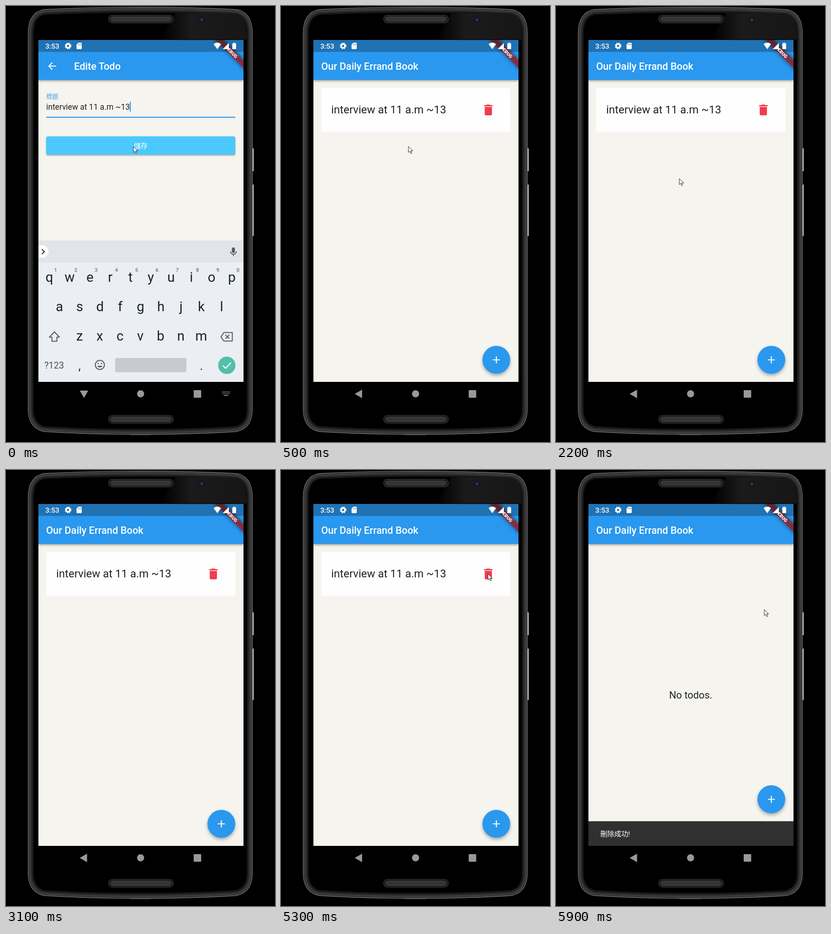
Write an HTML page that moves like this. It is 589 by 950 pixels and loops after 6000 ms.

```html
<!DOCTYPE html>
<html lang="zh-Hant">
<head>
<meta charset="utf-8">
<title>Todo app</title>
<style>
html, body { margin: 0; width: 100%; height: 100%; overflow: hidden; background: #000; }
svg { display: block; width: 589px; height: 950px; font-family: Roboto, "Noto Sans CJK TC", "Noto Sans CJK", sans-serif; }
</style>
</head>
<body>
<svg id="stage" viewBox="0 0 589 950"></svg>
<script>
const BLUE = '#2c98ee', CREAM = '#f5f4ee', KEY = '#17232e', GREY = '#525c65';
const LOOP = 6000, STEP = 100;

const text = (x, y, size, fill, str, extra = '') =>
  `<text x="${x}" y="${y}" font-size="${size}" fill="${fill}" ${extra}>${str}</text>`;
const rect = (x, y, w, h, fill, extra = '') =>
  `<rect x="${x}" y="${y}" width="${w}" height="${h}" fill="${fill}" ${extra}/>`;
const circle = (x, y, r, fill, extra = '') =>
  `<circle cx="${x}" cy="${y}" r="${r}" fill="${fill}" ${extra}/>`;
const path = (d, fill, extra = '') => `<path d="${d}" fill="${fill}" ${extra}/>`;
const line = (d, color, width, extra = '') =>
  path(d, 'none', `stroke="${color}" stroke-width="${width}" ${extra}`);
const icon = (x, y, scale, d, fill) =>
  path(d, fill, `transform="translate(${x} ${y}) scale(${scale}) translate(-12 -12)"`);
const middle = 'text-anchor="middle"';

// Phone outline, shrunk by i on every side
function body(i) {
  const l = 48 + i, r = 540 - i, t = 2 + i, b = 934 - i;
  return `M${l} 60Q${l} ${t + 11} 84 ${t + 5}Q180 ${t} 295 ${t}Q410 ${t} 504 ${t + 5}` +
    `Q${r} ${t + 11} ${r} 60V878Q${r} ${b - 13} 504 ${b - 6}Q410 ${b} 295 ${b}` +
    `Q180 ${b} 84 ${b - 6}Q${l} ${b - 13} ${l} 878Z`;
}

const speaker = y =>
  rect(224.5, y, 142, 17, '#1d1d1d', 'rx="8" stroke="#3c3c3c"') +
  rect(230, y + 4, 131, 9, '#343434', 'rx="4.5" stroke="#4a4a4a"');

const sideButton = (y, h) =>
  rect(538, y, 3, h, '#3a3a3a') + rect(540, y, 2.6, h, '#b0b0b0', 'rx="1"');

function phone() {
  let rim = '';
  for (let i = 3; i <= 12; i++) {
    const v = 68 - 6 * (i - 3);
    rim += path(body(i), `rgb(${v},${v},${v})`);
  }
  return sideButton(310, 50) + sideButton(389, 112) +
    rect(270, 930, 48, 6, '#222', 'rx="2"') +
    path(body(0.7), '#222', 'stroke="#777" stroke-width="1.4"') + rim +
    path(body(13), '#000') +
    path('M372 16H500Q527 20 527 60V73H340Z', 'url(#glare)') +
    speaker(20) + speaker(892) +
    circle(429, 30, 6.5, '#11131b') + circle(429, 30, 3.5, '#26325c');
}

const appBar = () => rect(71, 74, 449, 87, BLUE, 'filter="url(#bar)"');

const home = () => rect(71, 74, 449, 745, CREAM) +
  '<g id="card">' + rect(88, 179, 414, 95, '#fffefe', 'rx="5"') +
  text(110, 234, 24, '#212125', 'interview at 11 a.m ~13') +
  icon(454, 226.5, 1.31, 'M6 19c0 1.1.9 2 2 2h8c1.1 0 2-.9 2-2V7H6zM19 4h-3.5l-1-1h-5l-1 1H5v2h14z', '#f23b4e') +
  '</g>' +
  text(295, 498, 21.84, '#212125', 'No todos.', `${middle} id="empty"`) +
  appBar() + text(88, 139, 21.84, '#fff', 'Our Daily Errand Book', 'font-weight="500"') +
  '<g id="fab">' + circle(471.5, 0, 30.5, BLUE, 'filter="url(#high)"') +
  line('M463.8 0h15.4M471.5-7.7v15.4', '#fff', 2.2) + '</g>' +
  '<g id="snack">' + rect(71, 765.3, 449, 55, '#303030') +
  text(97, 798, 15.3, '#fff', '刪除成功!', 'id="snackText"') + '</g>';

const editor = () => rect(71, 74, 449, 745, CREAM) + appBar() +
  line('M110 131H94M101.5 123.3L93.8 131l7.7 7.7', '#fff', 2.1) +
  text(149, 139, 21.84, '#fff', 'Edite Todo', 'font-weight="500"') +
  text(88, 202, 13.1, '#4aa5ee', '標題') +
  text(88, 226, 17.47, '#212125', 'interview at 11 a.m ~13') +
  rect(271, 209, 2.2, 21, BLUE, 'id="caret"') +
  rect(88, 241.3, 414, 2.2, BLUE) +
  rect(88, 284, 414, 40, '#4cc9fc', 'rx="4" filter="url(#low)"') +
  `<g clip-path="url(#button)">${circle(0, 304, 1, '#fff', 'id="ripple" opacity=".22"')}</g>` +
  text(295, 310, 15.3, '#fff', '儲存', middle);

function keyRow(chars, x, y) {
  return [...chars].map((c, i) => text(x + 44.4 * i, y, 29.5, KEY, c, middle)).join('');
}

function keyboard() {
  const digits = [...'1234567890'].map((c, i) =>
    text(108.5 + 44.4 * i, 579, 11.5, '#6a737b', c, `${middle} font-weight="500"`)).join('');
  return rect(71, 511, 449, 309, '#ebeef3') + rect(71, 511, 449, 48, '#e1e4e8') +
    path('M71 521.5h8.5a13.5 13.5 0 0 1 0 27H71z', '#fff') +
    line('M78.5 530l5.5 5.3-5.5 5.3', '#222', 2) +
    rect(494.6, 526, 6.6, 12, GREY, 'rx="3.3"') +
    line('M491.5 534.5a6.4 6.4 0 0 0 12.8 0M497.9 541v4', GREY, 1.9) +
    digits + keyRow('qwertyuiop', 95, 600.5) + keyRow('asdfghjkl', 117, 664.5) +
    keyRow('zxcvbnm', 161, 729) +
    line('M106 710l-11 11.5h5.5v9h11v-9h5.5z', GREY, 2.1, 'stroke-linejoin="round"') +
    line('M477 711.5h18.5v18.5H477l-6.5-9.2zM480.5 716.5l8.6 8.6m0-8.6l-8.6 8.6', GREY, 2.1, 'stroke-linejoin="round"') +
    text(105.5, 790, 20, '#46515b', '?123', middle) +
    text(161, 793, 26, KEY, ',', middle) + text(428, 793, 26, KEY, '.', middle) +
    circle(205.5, 782, 10, 'none', `stroke="${GREY}" stroke-width="2.1"`) +
    circle(201.8, 779, 1.6, GREY) + circle(209.2, 779, 1.6, GREY) +
    path('M199.8 784h11.4a6 5 0 0 1-11.4 0z', GREY) +
    rect(239, 767, 156, 31, '#c7cbcf', 'rx="3"') +
    circle(483.5, 783, 19, '#52bfaa') +
    line('M475 783.5l5.8 5.8 12-12.3', '#fff', 2.3);
}

const statusBar = () => rect(71, 74, 449, 26, '#000', 'opacity=".25"') +
  text(86, 93, 15.5, '#fff', '3:53', 'font-weight="500"') +
  circle(136, 87, 4.1, 'none', 'stroke="#fff" stroke-width="3.2"') +
  circle(136, 87, 6.2, 'none', 'stroke="#fff" stroke-width="2" stroke-dasharray="2.9 1.969"') +
  path('M158.3 80h6a1.5 1.5 0 0 1 1.5 1.5v11a1.5 1.5 0 0 1-1.5 1.5h-8.3a1.5 1.5 0 0 1-1.5-1.5V84z', '#fff') +
  line('M158.5 82.5v3M161 82.5v3M163.5 82.5v3', '#2b78b5', 1.1) +
  path('M454.5 83q8.2-6.5 16.4 0L462.7 94z', '#fff') +
  path('M488 80.5V94H474.5z', '#fff') +
  path('M495.5 81.5h2.3V80h3.6v1.5h2.4V94h-8.3z', '#fff');

// The status icons stay above the band, its label on top of all
const ribbon = inner => `<g transform="translate(520 74) rotate(45)">${inner}</g>`;
const band = () => ribbon(
  rect(-50, 30.6, 100, 13.1, '#000', 'opacity=".5" filter="url(#soft)"') +
  rect(-50, 30.6, 100, 13.1, '#b71c1c', 'opacity=".63"'));
const label = () => ribbon(text(0, 40.8, 10.2, '#fff', 'DEBUG', `${middle} font-weight="900"`));

function navBar() {
  let dots = '';
  for (let i = 0; i < 6; i++) {
    dots += rect(473.5 + 2.9 * i, 840, 1.8, 1.8, '#999') + rect(473.5 + 2.9 * i, 843.6, 1.8, 1.8, '#999');
  }
  return path('M161.5 838h18.5l-9.2 16z', '#999', 'id="navDown"') +
    path('M161.5 845.3l16-9.3v18.6z', '#999', 'id="navBack"') +
    circle(294.7, 845, 7.8, '#999') + rect(411, 837, 16.4, 16.4, '#999', 'rx="1"') +
    `<g id="navKeys">${dots}${rect(477, 847.6, 9.5, 1.8, '#999')}</g>`;
}

const shadow = (id, dy, blur, alpha) =>
  `<filter id="${id}" x="-30%" y="-50%" width="160%" height="220%"><feDropShadow dx="0" dy="${dy}" stdDeviation="${blur}" flood-opacity="${alpha}"/></filter>`;

const stage = document.getElementById('stage');
stage.innerHTML = '<defs>' + shadow('low', 2, 1.8, .3) + shadow('bar', 2.5, 2.2, .36) + shadow('high', 4, 3.5, .3) +
  '<filter id="soft" x="-20%" y="-150%" width="140%" height="400%"><feGaussianBlur stdDeviation="4.3"/></filter>' +
  '<linearGradient id="glare"><stop offset="0" stop-color="#000"/><stop offset=".35" stop-color="#1b1b1b"/><stop offset="1" stop-color="#161616"/></linearGradient>' +
  `<clipPath id="screen">${rect(71, 74, 449, 745, '#000')}</clipPath>` +
  `<clipPath id="button">${rect(88, 284, 414, 40, '#000', 'rx="4"')}</clipPath></defs>` +
  phone() + '<g clip-path="url(#screen)">' + home() +
  `<g id="page">${editor()}</g>` + band() + statusBar() + label() +
  `<g id="keys">${keyboard()}</g></g>` + navBar() +
  path('M0 0V13.2L3.1 10.4 5.3 15.6 7.5 14.6 5.3 9.6H9.6Z', '#fff', 'id="mouse" stroke="#222" stroke-width="1" stroke-linejoin="round"');

const $ = id => document.getElementById(id);
const set = (id, attrs) => { for (const k in attrs) $(id).setAttribute(k, attrs[k]); };
const show = (id, on) => set(id, { visibility: on ? 'visible' : 'hidden' });
const ramp = (t, from, length) => Math.min(1, Math.max(0, (t - from) / length));

function bezier(x1, y1, x2, y2) {
  const at = (a, b, s) => 3 * a * s * (1 - s) ** 2 + 3 * b * s * s * (1 - s) + s ** 3;
  return x => {
    let lo = 0, hi = 1;
    for (let i = 0; i < 24; i++) {
      const mid = (lo + hi) / 2;
      if (at(x1, x2, mid) < x) lo = mid; else hi = mid;
    }
    return at(y1, y2, lo);
  };
}
const swift = bezier(.4, 0, .2, 1), easeIn = bezier(.42, 0, 1, 1), glide = bezier(.42, 0, .58, 1);

// time, x, y
const route = [
  [0, 279, 306], [700, 279, 306], [1200, 270, 376], [3600, 270, 376],
  [4100, 275, 248], [4500, 275, 248], [5100, 453, 226], [5500, 453, 226], [5800, 456, 304], [6000, 456, 304]
];

function mouseAt(t) {
  const i = route.findIndex(p => p[0] > t);
  const a = route[i - 1], b = route[i], k = glide((t - a[0]) / (b[0] - a[0]));
  return [a[1] + (b[1] - a[1]) * k, a[2] + (b[2] - a[2]) * k];
}

function draw(t) {
  const left = 1 - ramp(t, 214, 286);
  set('page', {
    transform: `translate(0 ${186 * (1 - swift(left))})`,
    opacity: easeIn(left)
  });
  show('page', left > 0);
  show('caret', t < 200);
  const spread = ramp(t, 60, 280);
  set('ripple', { cx: 281 + 12 * spread, r: 208 * spread });

  const typing = t < 300;
  show('navDown', typing);
  show('navKeys', typing);
  show('navBack', !typing);
  const drop = ramp(t, 320, 180);
  set('keys', { transform: `translate(0 ${309 * drop * drop})` });
  show('keys', drop < 1);

  const removed = t >= 5500;
  show('card', !removed);
  show('empty', removed);
  const rise = ramp(t, 5400, 250), lift = 53.5 * swift(rise);
  set('snack', { transform: `translate(0 ${53.5 - lift})` });
  show('snack', rise > 0);
  set('snackText', { opacity: ramp(rise, .45, .55) });
  set('fab', { transform: `translate(0 ${t < 400 ? 463.5 : 771 - lift})` });

  const [x, y] = mouseAt(t);
  set('mouse', { transform: `translate(${x} ${y})` });
  show('mouse', t < 2500 || t >= 3600);
}

const start = performance.now();
function tick() {
  const t = (performance.now() - start) % LOOP;
  draw(Math.floor(t / STEP) * STEP);
  requestAnimationFrame(tick);
}
tick();
</script>
</body>
</html>
```
